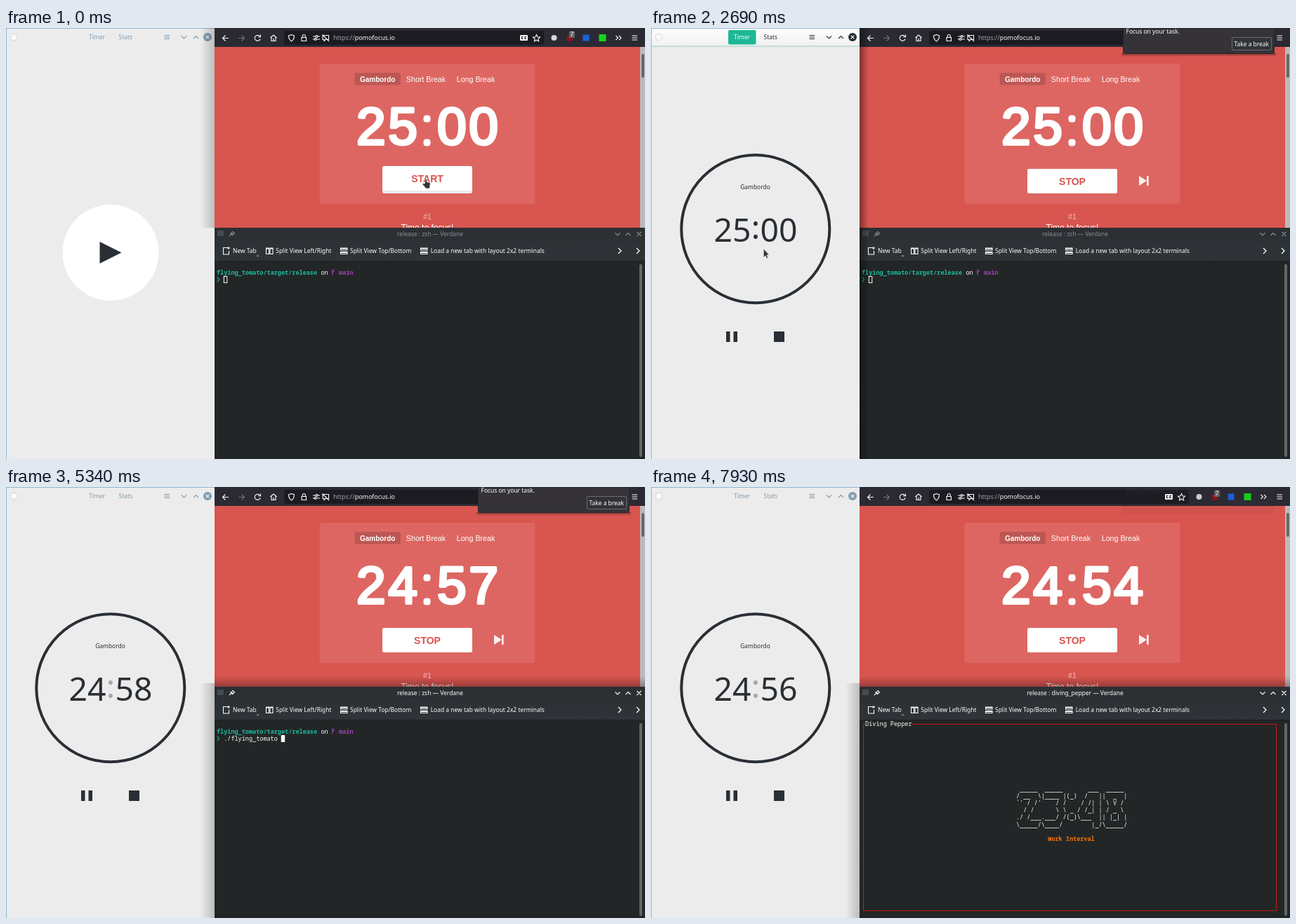
An HTML page for the animation above (8000 ms loop, 910x615 px).

```html
<!DOCTYPE html>
<html lang="en">
<head>
<meta charset="utf-8">
<title>Three timers</title>
<style>
html, body { margin: 0; width: 100%; height: 100%; overflow: hidden; background: #232627; }
svg { display: block; }
text { white-space: pre; }
.ui { font: 8.45px "Noto Sans", sans-serif; }
.web { font-family: "Liberation Sans", Arial, sans-serif; fill: #fff; }
.mono { font: 8.53px "Noto Sans Mono", monospace; fill: #fcfcfc; }
.mid { text-anchor: middle; }
.line { fill: none; stroke-width: 1.1; }
.big { font-size: 75px; stroke: #fff; stroke-width: 4; stroke-linejoin: round; letter-spacing: 3.5px; }
.num { font: 46.3px "Noto Sans", sans-serif; }
</style>
</head>
<body>
<svg width="910" height="615" viewBox="0 0 910 615">
  <defs>
    <linearGradient id="toLeft" x1="1" x2="0"><stop stop-opacity=".2"/><stop offset="1" stop-opacity="0"/></linearGradient>
    <linearGradient id="toRight"><stop stop-opacity=".4"/><stop offset="1" stop-opacity="0"/></linearGradient>
    <linearGradient id="toTop" x1="0" x2="0" y1="1" y2="0"><stop stop-opacity=".3"/><stop offset="1" stop-opacity="0"/></linearGradient>
    <linearGradient id="toBottom" x1="0" x2="0" y1="0" y2="1"><stop stop-opacity=".4"/><stop offset="1" stop-opacity="0"/></linearGradient>
    <linearGradient id="head" x1="0" x2="0" y1="0" y2="1"><stop stop-color="#fff"/><stop offset="1" stop-color="#f0f0f0"/></linearGradient>
    <linearGradient id="bar" x1="0" x2="0" y1="0" y2="1"><stop stop-color="#2b2f33"/><stop offset="1" stop-color="#2f3439"/></linearGradient>
  </defs>

  <!-- browser -->
  <rect x="297" width="613" height="28" fill="#2b2a33"/>
  <rect x="396" y="4" width="370" height="20" rx="3" fill="#1c1b22"/>
  <g class="line" stroke="#fbfbfe">
    <path d="M317 14.5h-8.5m4-4l-4 4l4 4"/>
    <path d="M331 14.5h8.5m-4-4l4 4l-4 4" opacity=".35"/>
    <path d="M361.5 12a4 4 0 1 0 .6 3.5M362.5 9.5v3.2h-3.2"/>
    <path d="M376.5 14l4.5-4l4.5 4M378 13v5.5h6V13M381 18v-3"/>
    <path d="M406.500 9.500l4 1.500c0 4-1 6-4 8c-3-2-4-4-4-8z"/>
    <path d="M421 13.500h6.500v5H421zM422.300 13v-1.500a2 2 0 0 1 4 0V13"/>
    <path d="M437 12h4m3 0h3M437 16h2m3 0h5"/><circle cx="442.500" cy="12" r="1.400"/><circle cx="440.500" cy="16" r="1.400"/>
    <path d="M451 10.500h8.500v6H455l-2 2v-2h-2zM450.500 9.500l9.500 9.500"/>
    <path d="M755.500 9.500l1.500 3.200l3.500.4l-2.600 2.400l.7 3.500l-3.100-1.800l-3.100 1.800l.7-3.500l-2.600-2.400l3.500-.4z"/>
    <path d="M868.500 11l3 3l-3 3M873 11l3 3l-3 3"/>
    <path d="M891.500 11h7.500M891.500 14h7.500M891.500 17h7.500"/>
  </g>
  <rect x="732" y="10" width="11" height="8" rx="1" fill="#fbfbfe"/>
  <path d="M736.500 12.500h-2v3h2M741 12.500h-2v3h2" class="line" stroke="#1c1b22"/>
  <circle cx="780.500" cy="14" r="4" fill="#d6d6da"/>
  <rect x="799" y="11" width="8" height="8" fill="#8b1519"/>
  <rect x="802" y="5" width="8" height="9" rx="1" fill="#666"/>
  <text x="806" y="12.200" class="ui mid" fill="#fff">7</text>
  <rect x="821.500" y="9.500" width="9" height="9" fill="#1d5fdc"/>
  <rect x="844.500" y="9" width="10" height="10" fill="#17d41c"/>
  <text x="466" y="17" class="ui" style="font-size:8.920px" fill="#a1a1a8">https://<tspan fill="#fbfbfe">pomofocus.io</tspan></text>

  <rect x="297" y="27" width="606" height="259" fill="#d95550"/>
  <rect x="903" y="27" width="7" height="259" fill="#bdb9ba"/>
  <rect x="905" y="37" width="4" height="34" rx="2" fill="#66686b"/>
  <rect x="446.500" y="51" width="307" height="200" rx="4" fill="#fff" opacity=".1"/>
  <rect x="496.500" y="64" width="65.500" height="17.500" rx="3" opacity=".15"/>
  <g class="web mid">
    <text x="529.200" y="76.500" font-size="10" font-weight="700">Gambordo</text>
    <text x="598" y="76.700" font-size="10.660">Short Break</text>
    <text x="669" y="76.700" font-size="10.660">Long Break</text>
    <text x="544.300" y="166.300" class="big" id="webMin"></text>
    <text x="659.300" y="166.300" class="big" id="webSec"></text>
    <rect x="594.500" y="124.500" width="10" height="10" rx="4"/>
    <rect x="594.500" y="158.500" width="10" height="10" rx="4"/>
    <rect x="536" y="200" width="128" height="36" rx="2.500" fill="#ebebeb" id="edge"/>
    <g id="button">
      <rect x="536" y="197" width="128" height="35" rx="2.500"/>
      <text x="600" y="219.500" font-size="14" font-weight="700" style="fill:#d95550" id="label"></text>
    </g>
    <path d="M695 211l11 7l-11 7zM706 211h2.700v14h-2.700z" id="skip"/>
    <text x="600" y="273" font-size="10.660" opacity=".6">#1</text>
    <text x="600" y="289" font-size="12">Time to focus!</text>
  </g>

  <!-- terminal -->
  <rect x="297" y="270" width="613" height="15" fill="url(#toTop)" id="termTop"/>
  <rect x="297" y="285" width="613" height="330" fill="#232627"/>
  <rect x="297" y="285" width="613" height="48" fill="url(#bar)"/>
  <rect x="297" y="332" width="613" height="1" fill="#1d2022"/>
  <rect x="301" y="289" width="9" height="8" fill="#454b50"/>
  <g id="termHead">
    <text x="604" y="297" class="ui mid" id="title"></text>
    <path d="M318 297l3-3M319.500 292.500l3.500 3.500M321 293l2-2.500l2.500 2.500l-2.500 2z" class="line" stroke="currentColor"/>
    <path d="M867.500 292.500l3.500 3.500l3.500-3.500M882.500 296l3.500-3.500l3.500 3.500M898.500 291l6 6m0-6l-6 6" class="line" stroke="currentColor"/>
  </g>
  <g class="ui" fill="#fcfcfc">
    <text x="323" y="321.300">New Tab</text>
    <text x="384.300" y="321.300">Split View Left/Right</text>
    <text x="490" y="321.300">Split View Top/Bottom</text>
    <text x="604.700" y="321.300">Load a new tab with layout 2x2 terminals</text>
  </g>
  <g class="line" stroke="#fcfcfc">
    <path d="M316 313.500h-6.500v9.500h8v-5M317 312v4m-2-2h4"/>
    <path d="M357 324.500l1.500 1.300l1.500-1.300" stroke-width=".8"/>
    <path d="M370.500 314h4v8.500h-4zM376 314h4v8.500h-4zM370 315h5M375.500 315h5"/>
    <path d="M476.500 314h9.500v3h-9.500zM476.500 319.500h9.500v3h-9.500zM476.500 315h9.500M476.500 320.500h9.500" id="rows"/>
    <path d="M590.500 314h9.500v3h-9.500zM590.500 319.500h9.500v3h-9.500zM590.500 315h9.500M590.500 320.500h9.500"/>
    <path d="M872 314l4 4l-4 4M898 314l4 4l-4 4" stroke-width="1.300"/>
  </g>
  <rect x="902" y="337" width="4" height="275" rx="2" fill="#63676a"/>

  <g id="shell" class="mono">
    <text x="300" y="351.600" font-weight="700" fill="#1abc9c">flying_tomato/target/release</text>
    <text x="448.400" y="351.600">on</text>
    <path d="M464.800 344.500v8M464.800 350c0-2 2.200-1.500 2.200-5" class="line" stroke="#9b45b5"/>
    <text x="474" y="351.600" font-weight="700" fill="#9b45b5">main</text>
    <path d="M301 355.700l2.600 3.300l-2.600 3.300" class="line" stroke="#1abc9c" stroke-width="1.400"/>
    <text x="310.200" y="361.800" id="typed"></text>
    <rect y="354.500" width="4.500" height="9" stroke="#fcfcfc" id="caret"/>
  </g>
  <g id="app" class="mono">
    <path d="M304.500 338.500h-2v266h588v-266H372" fill="none" stroke="#c41a1a"/>
    <text x="305.100" y="341.300">Diving Pepper</text>
    <g id="art"></g>
    <text x="598.500" y="504.800" class="mid" font-weight="700" fill="#f67400">Work Interval</text>
  </g>

  <!-- desktop timer -->
  <rect width="297" height="615" fill="#ececec"/>
  <rect width="297" height="26" fill="url(#head)" id="headBg"/>
  <path d="M0 .5H297M.5 0V615" stroke="#8fb6d0" fill="none"/>
  <path d="M0 26h297" stroke="#8fd3c4" id="headLine"/>
  <rect x="110" y="3" width="39.500" height="20.500" rx="2" fill="#1cb894" id="tab"/>
  <circle cx="11" cy="13" r="4.800" fill="#fafafa" stroke="#c8c8c8" stroke-width=".7"/>
  <g id="leftHead">
    <text x="129.500" y="16.200" class="ui mid" id="tabText">Timer</text>
    <text x="170.300" y="16.200" class="ui mid" fill="currentColor">Stats</text>
    <path d="M225.500 10.500h7.500M225.500 13h7.500M225.500 15.500h7.500M250 11.500l3.500 3.500l3.500-3.500M267 15l3.500-3.500l3.500 3.500" class="line" stroke="currentColor"/>
    <circle cx="287" cy="13" r="6" fill="currentColor"/>
    <path d="M284.700 10.700l4.600 4.600m0-4.600l-4.600 4.600" class="line" stroke="#fff"/>
  </g>
  <g id="play">
    <circle cx="149" cy="320.500" r="68.500" fill="#fff"/>
    <path d="M133.500 305l31 15.500l-31 15.500z" fill="#2a2f35"/>
  </g>
  <g id="timer" fill="#2a2f35">
    <circle cx="148.800" cy="286.800" r="105.500" fill="none" stroke="#2a2f35" stroke-width="4"/>
    <text x="148.500" y="229.600" class="ui mid">Gambordo</text>
    <text x="116" y="304.500" class="num mid" id="min"></text>
    <text x="149" y="301" class="num mid" id="colon">:</text>
    <text x="182" y="304.500" class="num mid" id="sec"></text>
    <path d="M107 433h5.500v15H107zM117.500 433h5.500v15h-5.500zM175 433h15v15h-15z"/>
  </g>
  <rect x="277" width="20" height="285" fill="url(#toLeft)" id="shadeWeb"/>
  <rect x="277" y="280" width="20" height="335" fill="url(#toLeft)" id="shadeTerm"/>
  <rect x="297" width="13" height="615" fill="url(#toRight)" id="shadeLeft"/>

  <g id="note">
    <rect x="670" y="36" width="220" height="5" fill="url(#toBottom)"/>
    <path d="M672.500 0h215v34.500q0 2-2 2h-211q-2 0-2-2z" fill="#353338" stroke="#26272a"/>
    <g class="ui" fill="#fcfcfc">
      <text x="676.500" y="8.400">Focus on your task.</text>
      <rect x="827.500" y="13.500" width="56" height="18" rx="1.500" fill="#313338" stroke="#6b6d70"/>
      <text x="855.300" y="25.700" class="mid">Take a break</text>
    </g>
  </g>

  <g id="pointer">
    <path id="hand" d="M-1.500 0V-6q1.300-1.500 2.600 0v3.500l4 1q1.500.5 1 2.500l-1 6h-5l-5-6q0-1.600 1.600-1.200z" fill="#333638" stroke="#e8e8e8" stroke-width=".7"/>
    <path id="arrow" d="M.4.300v12l2.700-2.400l1.800 3.900l1.700-.8l-1.800-3.900l3.300-.5z" fill="#333638" stroke="#d8d8d8" stroke-width=".6"/>
    <path id="beam" d="M-2.500-5.500h2q.5 0 .5.500q0-.5.500-.5h2M0-5V5M-2.500 5.500h2q.5 0 .5-.5q0 .5.500.5h2" class="line" stroke="#e8e8e8"/>
  </g>
</svg>
<script>
const $ = id => document.getElementById(id);
const show = (id, amount) => $(id).setAttribute("opacity", +amount);
const put = (id, value) => { if ($(id).textContent !== value) $(id).textContent = value; };
// Value of the last [time, value...] step already reached.
const at = (t, steps) => steps.filter(s => s[0] <= t).pop();

const glyphs = {
  2: [" _____ ", "/ __  \\", "`' / /'", "  / /  ", "./ /___", "\\_____/"],
  3: [" _____ ", "|____ |", "    / /", "    \\ \\", ".___/ /", "\\____/ "],
  4: ["   ___ ", "  /   |", " / /| |", "/ /_| |", "\\___  |", "    |_/"],
  5: [" _____ ", "|  ___|", "|___ \\ ", "    \\ \\", "/\\__/ /", "\\____/ "],
  0: [" _____ ", "|  _  |", "| |/' |", "|  /| |", "\\ |_/ /", " \\___/ "],
  8: [" _____ ", "|  _  |", " \\ V / ", " / _ \\ ", "| |_| |", "\\_____/"],
  9: [" _____ ", "|  _  |", "| |_| |", "\\____ |", ".___/ /", "\\____/ "],
  ":": ["   ", "(_)", "   ", " _ ", "(_)", "   "]
};
const artRows = glyphs[2].map((_, i) => {
  const row = document.createElementNS("http://www.w3.org/2000/svg", "text");
  row.setAttribute("x", 520);
  row.setAttribute("y", 433.500 + 10.230 * i);
  return $("art").appendChild(row);
});

const moves = [
  [0, 598, 222, "hand"], [1620, 356, 220, "arrow"], [1900, 235, 273, "arrow"],
  [2070, 165, 308, "arrow"], [2210, 157, 313, "arrow"], [2480, 160, 315, "arrow"],
  [2860, 260, 358, "arrow"], [3030, 351.500, 393, "beam"], [3210, 355.500, 400, "beam"], [4280, 0, 0, ""]
];
const typing = [[0, ""], [4280, "."], [4520, "./"], [4790, "./f"], [5340, "./flying_tomato "]];
const leftTicks = [0, 4280, 5340, 6310, 7280];
const webTicks = [0, 2860, 3860, 4790, 5760, 6900, 7930];

function clock(t, ticks) {
  const left = 1501 - ticks.filter(k => k <= t).length;
  return [Math.floor(left / 60), left % 60].map(n => String(n).padStart(2, "0"));
}

function draw() {
  const t = performance.now() % 8000;
  const leftOn = t >= 2480 && t < 3450, termOn = t >= 3450, appOn = t >= 7280;

  // web timer
  const [wm, ws] = clock(t, webTicks);
  put("webMin", wm);
  put("webSec", ws);
  const p = Math.min(1, Math.max(0, Math.ceil((t - 620) / 35) / 8));
  const pressed = t >= 620;
  put("label", pressed ? "STOP" : "START");
  $("button").setAttribute("transform", `translate(0 ${pressed ? 4 : 0})`);
  show("edge", !pressed);
  show("skip", p * .9);

  // desktop timer
  const [m, s] = clock(t, leftTicks);
  put("min", m);
  put("sec", s);
  $("colon").setAttribute("fill", termOn ? "#a6a7a8" : "#2a2f35");
  const fade = t < 2480 ? 0 : t < 2690 ? .5 : 1;
  show("timer", fade);
  show("play", 1 - fade);
  for (const id of ["headBg", "headLine", "tab", "shadeLeft"]) show(id, leftOn);
  $("leftHead").style.color = leftOn ? "#2a2f35" : "#7f9bb0";
  $("tabText").setAttribute("fill", leftOn ? "#fff" : "#7f9bb0");
  show("shadeWeb", t < 2480);
  show("shadeTerm", termOn);
  show("note", t < 2690 ? 0 : t < 7930 ? 1 : .05);

  // terminal
  show("termTop", termOn);
  $("termHead").style.color = termOn ? "#fcfcfc" : "#8a8f93";
  $("title").setAttribute("fill", termOn ? "#fcfcfc" : "#8a8f93");
  put("title", `release : ${t < 7930 ? "zsh" : "diving_pepper"} — Verdane`);
  show("shell", !appOn);
  show("app", appOn);
  const text = at(t, typing)[1];
  put("typed", text);
  $("caret").setAttribute("x", 310.300 + 5.120 * text.length);
  $("caret").setAttribute("fill", termOn ? "#fcfcfc" : "none");
  const digits = at(t, [[0, "23:50"], [7480, "23:49"], [7930, "23:48"]])[1];
  artRows.forEach((row, i) => row.textContent = [...digits].map(c => glyphs[c][i]).join(""));

  // pointer
  const [, x, y, shape] = at(t, moves);
  $("pointer").setAttribute("transform", `translate(${x} ${y})`);
  for (const id of ["hand", "arrow", "beam"]) show(id, id === shape);

  requestAnimationFrame(draw);
}
draw();
</script>
</body>
</html>
```
